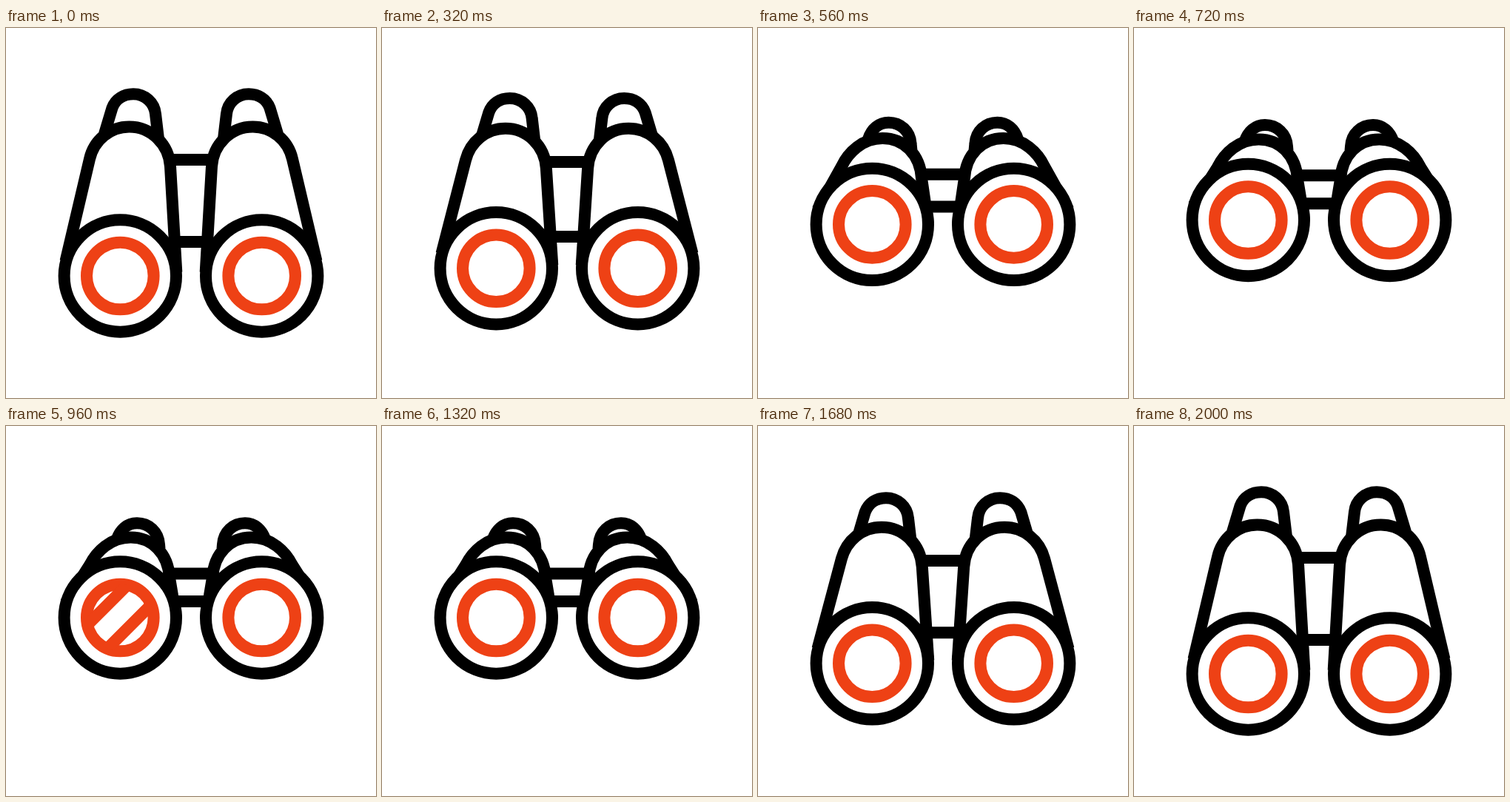
Recreate the animation shown at these times as an HTML page. Size 500x500 px, loop 2200 ms.

```html
<!DOCTYPE html>
<html lang="en">
<head>
<meta charset="utf-8">
<title>Binoculars</title>
<style>
  html, body { margin: 0; width: 100%; height: 100%; overflow: hidden; background: #fff; }
  svg { display: block; width: 100%; height: 100%; }
  .ink { fill: #fff; stroke: #000; stroke-width: 16; }
  .glow { fill: none; stroke: #ee4115; stroke-width: 16; }
</style>
</head>
<body>
<svg viewBox="0 0 500 500">
  <defs>
    <clipPath id="glass"><circle r="45.3"/></clipPath>
    <g id="half">
      <path id="cup" class="ink"/>
      <path id="body" class="ink"/>
    </g>
    <g id="lens">
      <circle class="ink" r="75.7"/>
      <circle class="glow" r="45.3"/>
    </g>
    <path id="streaks" class="glow" d="M-89.5 60L30.5 -60M-30.5 60L89.5 -60"/>
  </defs>
  <path id="bridge" class="ink"/>
  <use href="#half"/>
  <use href="#half" transform="matrix(-1 0 0 1 500 0)"/>
  <g class="eye"><use href="#lens"/><g clip-path="url(#glass)"><use class="shine" href="#streaks"/></g></g>
  <g class="eye"><use href="#lens"/><g clip-path="url(#glass)"><use class="shine" href="#streaks"/></g></g>
</svg>
<script>
const LOOP = 2200, STEP = 40;
const LENS_X = [154.3, 345.7];
const SHINE_START = [800, 1000], SHINE_TIME = 320;

// Each part: raised pose, lowered pose
const POSES = {
  cup: [
    'M133 143 L143.5 108 C148 96 159 89.3 172 89.3 C188 89.3 200.5 101 202 116 L206 150',
    'M146 168 L149.5 154 C154 140 164 131.3 177 131.3 C193 131.3 206 143 207 160 L207.5 166'
  ],
  body: [
    'M80.5 315 L113 177 C119 151 141 133.5 166.5 133.5 C196 133.5 220 157 222 187 L230.3 330',
    'M80.5 239 L113 188 C122 170 141 150.5 168.5 150.5 C197 150.5 219 172 221 205 L230 259'
  ],
  bridge: [
    'M222 178 L278 178 M228 289 L272 289',
    'M222 199.5 L278 199.5 M228 237 L272 237'
  ]
};

const eyes = document.querySelectorAll('.eye');
const shines = document.querySelectorAll('.shine');
const clamp = v => Math.min(1, Math.max(0, v));
const mix = (a, b, p) => a + (b - a) * p;

function mixPath([from, to], p) {
  const ends = to.match(/[\d.]+/g);
  let i = 0;
  return from.replace(/[\d.]+/g, n => mix(+n, +ends[i++], p).toFixed(2));
}

// Cubic bezier easing (0.45, 0, 0.03, 1), solved by bisection
function ease(x) {
  if (x <= 0 || x >= 1) return clamp(x);
  let lo = 0, hi = 1, s;
  for (let i = 0; i < 24; i++) {
    s = (lo + hi) / 2;
    const r = 1 - s;
    if (3 * s * r * r * 0.45 + 3 * s * s * r * 0.03 + s ** 3 < x) lo = s; else hi = s;
  }
  return s * s * (3 - 2 * s);
}

function draw(t) {
  const p = ease((t - 200) / 600) - ease((t - 1400) / 600);
  for (const id in POSES) {
    document.getElementById(id).setAttribute('d', mixPath(POSES[id], p));
  }
  eyes.forEach((eye, i) => {
    eye.setAttribute('transform', `translate(${LENS_X[i]} ${mix(335, 259, p)})`);
    const q = (t - SHINE_START[i]) / SHINE_TIME;
    shines[i].setAttribute('visibility', q > 0 && q < 1 ? 'visible' : 'hidden');
    shines[i].setAttribute('transform', `translate(${mix(-100, 90, clamp(q))} 0)`);
  });
}

const start = performance.now();
function tick() {
  const t = (performance.now() - start) % LOOP;
  draw(Math.floor(t / STEP) * STEP);
  requestAnimationFrame(tick);
}
tick();
</script>
</body>
</html>
```
